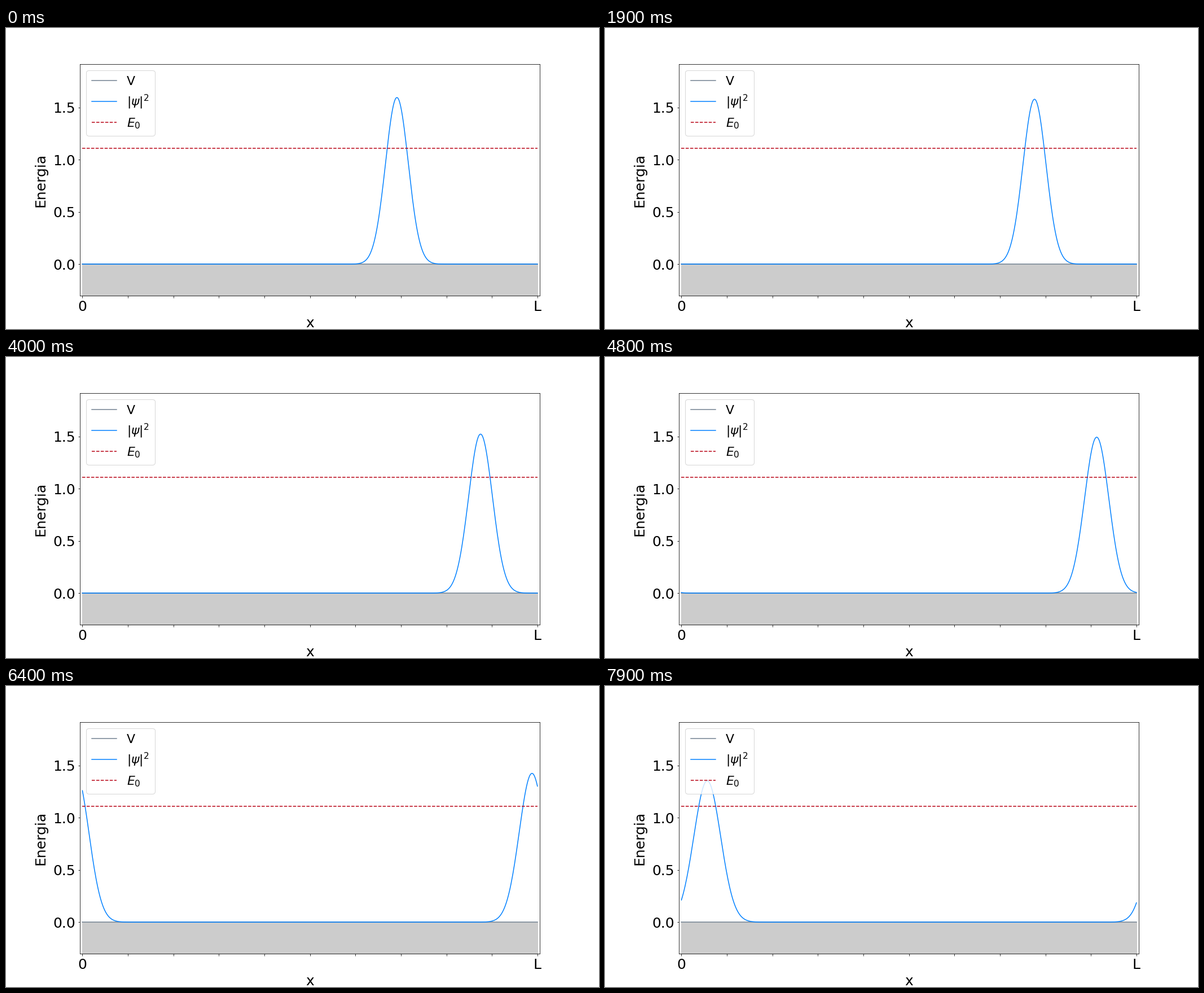
A matplotlib script for the animation above (8 s loop, 1051x533 px).

```python
import matplotlib.pyplot as plt
import numpy as np
from matplotlib.animation import FuncAnimation

DPI = 72
WIDTH, HEIGHT = 1051, 533
FRAMES, INTERVAL = 80, 100

L = 10.0
POINTS = 500
SIGMA = 0.25
START = 6.912
K0 = 15 * np.pi
DT = 0.001
ENERGY = K0**2 / 2000
Y_MIN, Y_MAX = -0.304, 1.915

x = np.linspace(0, L, POINTS)
period = L + x[1]


def density(step):
    """Free Gaussian packet that drifts, spreads and wraps around the box."""
    t = step * DT
    sigma = SIGMA * np.hypot(1, t / (2 * SIGMA**2))
    center = START + K0 * t
    offset = (x - center + period / 2) % period - period / 2
    return np.exp(-(offset / sigma) ** 2 / 2) / (sigma * np.sqrt(2 * np.pi))


plt.rcParams["font.family"] = "DejaVu Sans"
fig, ax = plt.subplots(figsize=(WIDTH / DPI, HEIGHT / DPI), dpi=DPI)
fig.subplots_adjust(left=0.125, right=0.9, bottom=0.11, top=0.88)

ax.fill_between([0, L], Y_MIN, 0, color="#cccccc")
ax.plot([0, L], [0, 0], color="slategray", label="V")
wave, = ax.plot(x, density(0), color="#0080ff", label=r"$|\psi|^2$")
ax.plot([0, L], [ENERGY, ENERGY], "--", color="#b80012", label="$E_0$")

ax.set_xlim(-0.05, L + 0.05)
ax.set_ylim(Y_MIN, Y_MAX)
ax.set_xticks(range(11), ["0"] + [""] * 9 + ["L"])
ax.set_yticks([0, 0.5, 1, 1.5])
ax.tick_params(labelsize=25, pad=4.5)
ax.set_xlabel("x", fontsize=25)
ax.set_ylabel("Energia", fontsize=25)
ax.xaxis.set_label_coords(0.5, -0.0895)
ax.yaxis.set_label_coords(-0.0705, 0.5)
ax.legend(loc="upper left", fontsize=22, borderpad=0.45)


def update(frame):
    # The opening pose is held for two frames.
    wave.set_ydata(density(max(0, frame - 1)))
    return wave,


anim = FuncAnimation(fig, update, frames=FRAMES, interval=INTERVAL, repeat=True)
plt.show()
```
